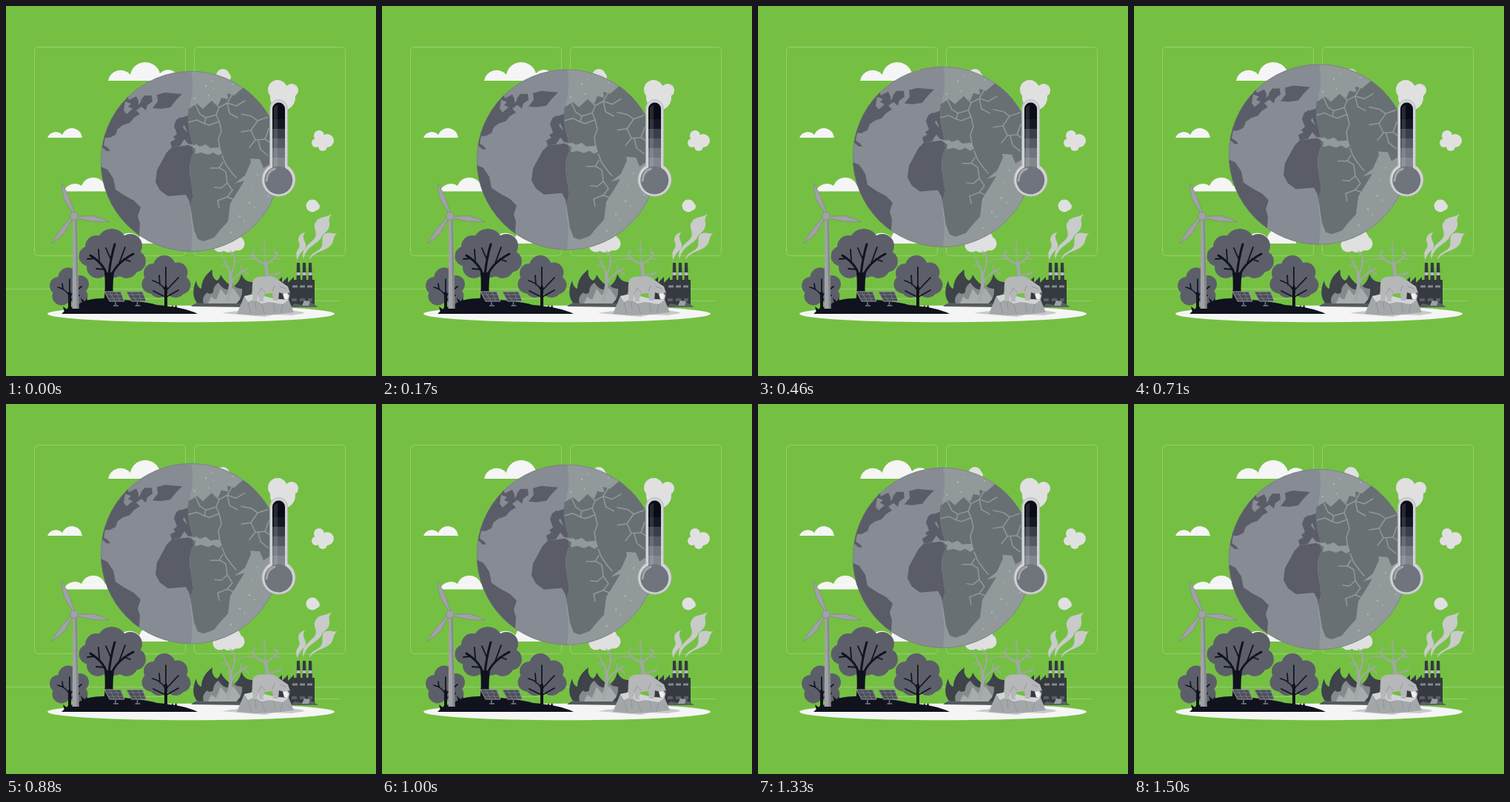
Write an HTML page that moves like this. It is 500x500 px and loops after 1.54 s.

```html
<!DOCTYPE html>
<html lang="en">
<head>
<meta charset="utf-8">
<title>Warming globe</title>
<style>
html, body { margin: 0; width: 100%; height: 100%; overflow: hidden; background: #75c043; }
svg { display: block; width: 100vw; height: 100vh; }
.line { fill: none; stroke-linecap: round; stroke-linejoin: round; }
</style>
</head>
<body>
<svg viewBox="0 0 500 500">
<defs>
  <clipPath id="disc"><circle cx="250" cy="210" r="122"/></clipPath>
  <path id="dryHalf" d="M250 87Q254 104 251 122T247 146Q245 160 249 174T253 199Q246 213 249 231T253 257Q247 272 250 288T250 333H375V87Z"/>
  <clipPath id="dry"><use href="#dryHalf"/></clipPath>
  <g id="land">
    <path d="M120 190V140L160 108 166 127 176 122 180 130 187 121 197 121 198 129 191 134 189 141 183 136 176 141 181 146 173 151 167 158 158 161 151 166 148 174 140 178 134 178 132 188 138 192 141 196 136 196 129 190Z"/>
    <path d="M204 120L215 117 238 119 230 127 222 137 209 139 198 138 205 129Z"/>
    <path d="M126 216L137 221 145 233 148 248 160 256 173 263 182 272 178 284 181 294 179 325 110 290Z"/>
    <path d="M227 162L230 154 236 150 242 158 239 164 244 170 257 176 256 188 246 186 241 180 235 189 224 191 222 184 229 180 226 177 231 173Z"/>
    <path d="M237 151L246 148 247 139 258 132 266 139 278 128 287 134 291 124 300 126 299 118 308 121 321 110 380 120V212L356 214 348 219 343 207 330 206 331 211 323 229 309 240 322 236 313 251 303 267 300 291 289 303 281 313 267 318 259 315 254 302 251 282 248 264 243 255 219 257 208 249 202 238 204 222 217 198 224 191 247 188 256 193 255 200 264 198 273 201 280 198 287 202 292 199 289 191 276 192 270 187 262 190 254 185 248 178Z"/>
  </g>
</defs>

<rect width="500" height="500" fill="#75c043"/>
<g class="line" stroke="#a0d47a" stroke-width=".8">
  <rect x="38.5" y="55.5" width="204" height="282" rx="5"/>
  <rect x="254.5" y="55.5" width="204" height="282" rx="5"/>
  <path d="M0 382.500H500M418 398.500H450M184 395.500H215"/>
</g>

<g fill="#f5f5f5">
  <path d="M138 101A17 17 0 0 1 168 93A20.500 20.500 0 0 1 208 91A15 15 0 0 1 234 101Z"/>
  <path d="M56 178A12 12 0 0 1 76 174A14 14 0 0 1 103 178Z"/>
  <path d="M78 250.500A16 16 0 0 1 102 243A17 17 0 0 1 134 243L150 250.500Z"/>
  <path d="M150 321A17 17 0 0 1 180 313A20 20 0 0 1 219 321Z"/>
</g>
<g fill="#e0e0e0">
  <circle cx="293" cy="94" r="9"/><circle cx="299" cy="96" r="5"/>
  <circle cx="302" cy="317" r="16"/><circle cx="289" cy="323" r="9.500"/><circle cx="313" cy="321" r="9.500"/>
  <circle cx="367" cy="113" r="13"/><circle cx="386" cy="114" r="9"/><circle cx="374" cy="124" r="17"/>
  <circle cx="423" cy="175" r="7"/><circle cx="434" cy="182" r="9"/><circle cx="428" cy="190" r="6"/><circle cx="419" cy="185" r="6"/><circle cx="427" cy="182" r="8"/>
  <circle cx="414" cy="270" r="8.500"/><circle cx="419" cy="271" r="5"/>
</g>

<g id="globe">
  <g clip-path="url(#disc)">
    <rect x="128" y="88" width="244" height="244" fill="#878b93"/>
    <use href="#land" fill="#5a5d67"/>
    <path d="M161 129L169 132 165 136 171 139 163 146 159 141ZM179 126L183 128 179 134Z" fill="#878b93"/>
    <use href="#dryHalf" fill="#92999b"/>
    <g clip-path="url(#dry)">
      <use href="#land" fill="#687073"/>
      <g class="line" stroke="#92999b" stroke-width="1.500">
        <path d="M256 133L262 146 270 151 284 147 288 137 299 131 306 119M270 151L268 159 275 161 288 156 284 147M288 156L291 169 287 180 289 193M288 137L280 129M247 157L258 154 268 159M299 131L311 135 323 128M299 131L302 145 313 151M318 146L332 149 340 155 354 150M318 170L331 168 340 155M331 168L337 181 329 191M337 181L350 180 360 187M350 180L355 166M341 182L344 194 354 202"/>
        <path d="M292 202L297 214 305 225 311 232M276 219L289 219 297 224 299 239 291 246 282 245M299 239L306 249 299 258 309 262M299 258L286 263 288 273M293 211L288 219"/>
      </g>
      <g fill="#adb4b4">
        <circle cx="270" cy="108" r="1.300"/><circle cx="278" cy="101" r=".9"/><circle cx="255" cy="125" r="1.200"/><circle cx="274" cy="121" r="1"/><circle cx="306" cy="106" r="1.100"/><circle cx="281" cy="112" r=".7"/>
        <circle cx="340" cy="228" r="1.100"/><circle cx="329" cy="266" r="1.300"/><circle cx="316" cy="284" r="1.300"/><circle cx="336" cy="272" r="1"/><circle cx="322" cy="291" r="1"/><circle cx="304" cy="306" r="1.200"/><circle cx="354" cy="257" r="1.100"/><circle cx="332" cy="245" r=".8"/>
      </g>
    </g>
  </g>
  <circle cx="250" cy="210" r="121.700" fill="none" stroke="#6c7077" stroke-width=".5"/>
</g>

<!-- thermometer -->
<path d="M356.500 138.500A12 12 0 0 1 380.500 138.500V215.500A22.600 22.600 0 1 1 356.500 215.500Z" fill="#d2d2d3" stroke="#aeb0b2" stroke-width=".7"/>
<path d="M360 139A8.500 8.500 0 0 1 377 139V220H360Z" fill="#090c17"/>
<g id="scale"></g>
<circle cx="368.300" cy="235.500" r="19" fill="#70747d"/>
<path class="line" d="M352 236Q353 223 363 220" stroke="#a4a7ad" stroke-width="3"/>
<path d="M362 139Q362 135 367 134V217H362Z" fill="#fff" opacity=".12"/>

<!-- ground -->
<ellipse cx="250" cy="416" rx="194" ry="11.300" fill="#f5f5f5"/>
<g fill="#5c5f69">
  <circle cx="143" cy="321" r="20"/><circle cx="122" cy="325" r="15"/><circle cx="168" cy="324" r="16"/><circle cx="112" cy="338" r="13.500"/><circle cx="174" cy="345" r="15"/><circle cx="124" cy="353" r="15"/><circle cx="163" cy="353" r="15"/><circle cx="145" cy="342" r="25"/>
  <circle cx="84" cy="367" r="13.500"/><circle cx="71" cy="378" r="12"/><circle cx="100" cy="376" r="12"/><circle cx="75" cy="392" r="12.500"/><circle cx="98" cy="392" r="12.500"/><circle cx="85" cy="382" r="17"/>
  <circle cx="214" cy="352" r="15"/><circle cx="199" cy="361" r="13"/><circle cx="232" cy="360" r="13.500"/><circle cx="196" cy="376" r="12.500"/><circle cx="237" cy="377" r="12.500"/><circle cx="207" cy="380" r="14"/><circle cx="229" cy="380" r="14"/><circle cx="216" cy="369" r="20"/>
</g>
<path d="M132 402Q135 380 133 360H146Q143 382 146 402Z" fill="#10131e"/>
<g class="line" stroke="#10131e">
  <path d="M136 364Q133 349 114 337M139 364Q141 342 147 322M143 364Q148 348 172 335" stroke-width="3"/>
  <path d="M126 344L125 329M120 341L110 342M141 341L135 327M152 350L161 326M159 342L168 345M134 356L122 355" stroke-width="1.800"/>
  <path d="M86 410V388M216 412V380" stroke-width="4"/>
  <path d="M86 392Q80 382 70 380M87 391L102 379M86 390V369M88 397L99 391M77 383L76 375M216 385Q210 374 198 371M217 384L233 367M216 380V353M217 393L233 384M208 377L207 364M199 385L215 393" stroke-width="1.700"/>
</g>
<path d="M75 416Q82 408 98 403Q109 395 132 395Q185 398 204 404Q241 407 259 416Z" fill="#10131e"/>
<path d="M104 404L101 394 107 400 109 395 112 403ZM223 409L225 404 227 408 230 404 232 410ZM79 414L77 406 82 410 85 406 87 414Z" fill="#10131e"/>

<g id="panel">
  <path d="M148 400V405M145 405H152" stroke="#777b84" stroke-width="1.500"/>
  <path d="M133 386H155L160 399H140Z" fill="#4a4d58" stroke="#9699a0"/>
  <path d="M135 390H157M138 395H158M140 386L147 399M148 386L154 399" stroke="#858992" stroke-width=".7"/>
</g>
<use href="#panel" x="29.500"/>

<!-- wind turbine -->
<path d="M90.500 288H95.500L98.500 409H89.500Z" fill="#a0a2a6"/>
<path d="M93.500 288H95.500L98.500 409H95.500Z" fill="#85888e"/>
<g fill="#a0a2a6" stroke="#7e8289" stroke-width=".6">
  <path id="blade" d="M90 280L79 262Q76 252 75 239Q81 248 86 260L92.500 279Z"/>
  <use href="#blade" transform="rotate(120 92 284)"/>
  <use href="#blade" transform="rotate(240 92 284)"/>
  <circle cx="92" cy="284" r="5.300"/>
</g>

<!-- wildfire -->
<path d="M250 406Q260 397 278 401H323L326 407Z" fill="#545a5d"/>
<path d="M258 401Q249 390 257 371Q258 380 264 382Q264 367 279 356Q277 367 285 371Q289 369 290 363Q298 377 308 379Q317 371 318 362Q323 374 333 373Q336 389 323 402Z" fill="#3d4348"/>
<path d="M267 402Q264 393 272 387Q275 391 280 387Q280 378 287 374Q294 384 300 383Q301 374 305 371Q308 383 319 382Q320 394 312 402Z" fill="#858a8c"/>
<path d="M273 402L277 393 284 397 290 382 297 391 307 381 317 395 311 402Z" fill="#a9acad"/>
<g class="line" stroke="#a2a7a8" stroke-width="2.200">
  <path d="M299 397Q306 378 303 362M350 372Q355 358 350 347" stroke-width="4.500"/>
  <path d="M304 374Q312 362 326 355M303 363Q302 354 296 346M304 363Q311 350 308 335M350 349Q337 345 333 334M351 349Q364 344 367 332M353 362Q366 364 371 359"/>
  <path d="M300 353L291 350M297 347L292 335M309 346L326 341M309 339L303 331M316 360L319 351M321 357L328 364M336 342L328 341M333 335L337 329M351 346L349 318M350 333L346 327M363 341L371 342M365 337L362 328" stroke-width="1.300"/>
</g>

<!-- factory -->
<path d="M365 406V374L373 366V374L381 366V374L389 366V370H417V406Z" fill="#353a40"/>
<g id="stack"><path d="M392.500 371L393 347H397L398 371Z" fill="#353a40"/><path d="M392.700 360H397.600V364H392.500Z" fill="#b7babb"/></g>
<use href="#stack" x="8"/><use href="#stack" x="16"/>
<path d="M387 379H415" stroke="#858a8d" stroke-width="3" stroke-dasharray="7 3"/>
<path d="M386 397H414" stroke="#596065" stroke-width="4" stroke-dasharray="7 4"/>
<path d="M384 407L390 402 400 404 404 398 413 401 422 407Z" fill="#596065"/>
<path d="M400 405L403 398 411 399 409 405Z" fill="#9ca0a2"/>
<g fill="#c9cbca">
  <path d="M394 343C388 330 400 328 396 320C393 312 398 307 404 306C399 312 404 317 405 322C406 331 396 331 394 343Z"/>
  <path d="M402 342C398 328 410 322 417 314C423 306 412 298 420 290C425 284 433 286 440 281C434 289 438 291 437 297C436 305 428 307 426 313C420 323 406 324 402 342Z"/>
  <path d="M410 343C411 332 424 333 427 324C429 316 425 309 433 307C440 305 443 309 448 307C441 312 444 316 440 322C433 332 418 330 410 343Z"/>
</g>

<!-- bear on ice -->
<path d="M292 415Q325 409 365 412Q395 410 404 415L386 418 362 417 350 420 326 418Z" fill="#c7c9ca"/>
<path d="M312 416L322 392 336 389 365 396 382 397 389 414 364 417 337 418Z" fill="#a4a7a9"/>
<path d="M322 392L336 389 365 396 382 397 374 403 356 400 345 402 336 396 327 400Z" fill="#d2d4d5"/>
<path d="M327 400L331 416M345 402L350 417M374 403L371 415M336 396L338 411M361 401L364 413" stroke="#8f9497" fill="none"/>
<path d="M333 392Q332 378 334 371Q338 364 350 366Q359 363 367 369Q373 374 381 379L384 388 382 397 377 396 375 389 369 387 368 398H361L360 388 350 389 347 397 350 399H342L341 391 339 397 341 399H334Z" fill="#b6b7b8"/>
<path d="M341 389L345 381 350 387M360 385L363 378M370 379L378 382" class="line" stroke="#96999c"/>
<path d="M374 389L379 388 382 392 380 397 376 396Z" fill="#f0f0f0"/>
<path d="M381 387L384 388 383 391Z" fill="#34383d"/>
</svg>
<script>
const LOOP = 1540, PEAK = 730, LAND = 1500, LIFT = 9.7;
const globe = document.getElementById('globe');

const bands = ['#151924', '#3a3e49', '#555963', '#70747d', '#83868e'];
document.getElementById('scale').innerHTML = bands.map((fill, i) =>
  `<rect x="360" y="${153 + 13 * i}" width="17" height="13.5" fill="${fill}"/>`).join('');

// Steady rise to the peak, steady return, then a short rest.
function draw(now) {
  const t = now % LOOP;
  const lift = LIFT * Math.max(0, Math.min(t / PEAK, (LAND - t) / (LAND - PEAK)));
  globe.setAttribute('transform', `translate(0 ${-lift})`);
  requestAnimationFrame(draw);
}
draw(performance.now());
</script>
</body>
</html>
```
